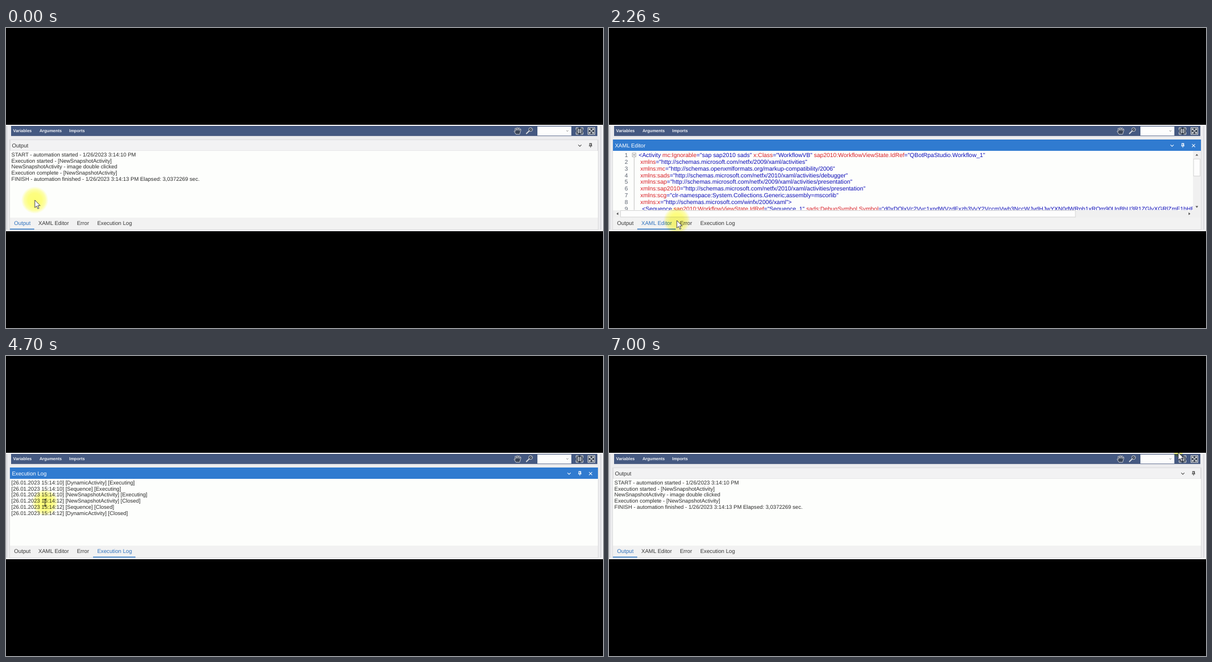
An HTML page for the animation above (7030 ms loop, 1056 by 530 pixels).

```html
<!DOCTYPE html>
<html lang="en">
<head>
<meta charset="utf-8">
<title>Output panels</title>
<style>
  html, body { margin: 0; width: 100%; height: 100%; overflow: hidden; background: #000; }
  svg { display: block; width: 1056px; height: 530px; }
  text { font-family: "Liberation Sans", Arial, sans-serif; white-space: pre; text-rendering: geometricPrecision; }
  .menu { font: 600 7.5px "Open Sans", sans-serif; fill: #f0f2f6; }
  .ui { font-size: 9.7px; fill: #383838; }
  .log { font-size: 9.56px; fill: #2c2c2c; }
  .code { font-size: 10.42px; fill: #0c0cb8; }
  .num { font-size: 10.2px; fill: #5c6470; text-anchor: end; }
  .attr { fill: #d81c24; }
  .line { fill: none; stroke-width: 1.05; }
  #halo { mix-blend-mode: multiply; }
</style>
</head>
<body>
<svg viewBox="0 0 1056 530">
  <defs>
    <clipPath id="band"><rect y="171" width="1056" height="188"/></clipPath>
    <clipPath id="codeArea"><rect x="7" y="217" width="1025.5" height="104.5"/></clipPath>
    <radialGradient id="glow">
      <stop offset="0" stop-color="#ffff78"/>
      <stop offset=".5" stop-color="#ffff80"/>
      <stop offset=".78" stop-color="#ffff88" stop-opacity=".7"/>
      <stop offset="1" stop-color="#ffff98" stop-opacity="0"/>
    </radialGradient>
    <g id="chevron"><path class="line" d="M-2.8-1.3 0 1.4 2.8-1.3"/></g>
    <g id="pin"><path class="line" d="M-1.7-3.4H1.7V.6H-1.7ZM-3 .8H3M0 .8V3.8M1-3.2V.4"/></g>
    <g id="close"><path class="line" d="M-2.7-2.7 2.7 2.7M2.7-2.7-2.7 2.7"/></g>
  </defs>
  <rect width="1056" height="530"/>
  <g clip-path="url(#band)">
    <rect y="171" width="1056" height="188" fill="#ececee"/>
    <path d="M0 172H1056M0 358H1056" stroke="#f6f6f8" stroke-width="2"/>
    <path d="M1.5 173V356M1052.5 173V356" stroke="#c4c5cb"/>
    <path d="M1054.5 171V359" stroke="#f7f7f9" stroke-width="3"/>

    <rect x="9" y="173" width="1037" height="17.5" fill="#455981"/>
    <path d="M9 174H1046M9 190H1046" stroke="#3c4f76"/>
    <g class="menu">
      <text x="12.6" y="184.3">Variables</text>
      <text x="59.2" y="184.3">Arguments</text>
      <text x="111.8" y="184.3">Imports</text>
    </g>
    <g fill="none" stroke="#d8dade" stroke-width=".9" stroke-linejoin="round" stroke-linecap="round">
      <path d="M901.8 187.4 898.8 182.6Q898.8 180.8 901 182.5L900.4 177.6Q901.6 176 902.4 178L903.2 181 903.4 176.4Q904.7 174.7 905.5 176.6V180.8L906.8 176.7Q908.2 175.5 908.7 177.3L908 181.3 909.6 178.7Q911 178 910.8 180L908.7 187.4Z" fill="#3a4558"/>
      <circle cx="928" cy="179.4" r="3.4" fill="#3a4558"/>
      <path d="M925.4 181.8 920.6 186.5" stroke-width="1.8"/>
      <path d="M927 180.3 929.3 178.2" stroke-width=".8"/>
    </g>
    <rect x="940" y="174" width="60" height="16" fill="#fdfdfd"/>
    <use href="#chevron" transform="translate(993 181.7) scale(.65)" stroke="#555"/>
    <g fill="#3c4654" stroke="#dfe1e4" stroke-width="1.1">
      <rect x="1008.5" y="176" width="12" height="12" stroke-dasharray="4 4 4 0"/>
      <path d="M1011 178 1013 180M1018 178 1016 180M1011 186 1013 184M1018 186 1016 184M1008.5 182H1012M1017 182H1020.5"/>
      <rect x="1012.7" y="180.2" width="3.6" height="3.6"/>
      <rect x="1029.5" y="176" width="12" height="12"/>
      <path d="M1031.5 178 1039.5 186M1039.5 178 1031.5 186M1031.5 180.5V178H1034M1037 178H1039.5V180.5M1031.5 183.5V186H1034M1037 186H1039.5V183.5"/>
    </g>

    <rect x="6.5" y="197.5" width="1041" height="159" fill="#f2f2f2" stroke="#dcdcde"/>
    <rect id="bar" x="7.5" y="197.5" width="1039" height="19.5"/>
    <text id="title" class="ui" x="10.4" y="210.9"/>
    <g id="buttons">
      <use href="#chevron" x="996" y="207.7"/>
      <use href="#pin" x="1015" y="207.5"/>
      <use id="closer" href="#close" x="1034" y="207.7"/>
    </g>
    <rect x="7" y="217" width="1040" height="118" fill="#fdfefc"/>
    <g id="panes"></g>
    <g id="tabs" class="ui"></g>
    <rect id="mark" y="354.5" height="1.6" fill="#3a80cc"/>

    <circle id="halo" fill="url(#glow)"/>
    <path id="arrow" d="M0 0V13.4L3.1 10.5 5.2 15.3 7.3 14.4 5.2 9.8H9.4Z" fill="#fff" stroke="#2c2c38" stroke-width=".9" stroke-linejoin="round"/>
    <path id="beam" d="M-2.6-5.8H-.8L0-5.2.8-5.8H2.6M0-5.2V5.2M-2.6 5.8H-.8L0 5.2.8 5.8H2.6" fill="none" stroke="#222" stroke-width="1.1"/>
  </g>
</svg>
<script>
const LOOP = 7030;
const $ = id => document.getElementById(id);

const el = (parent, tag, attrs = {}, text = '') => {
  const node = document.createElementNS('http://www.w3.org/2000/svg', tag);
  for (const key in attrs) node.setAttribute(key, attrs[key]);
  node.textContent = text;
  return parent.appendChild(node);
};

// name, label x, underline start, underline end
const tabs = [
  ['Output', 14.3, 7, 50],
  ['XAML Editor', 57.2, 50, 118],
  ['Error', 125.4, 118, 154],
  ['Execution Log', 161.4, 154, 229]
];
const labels = tabs.map(([name, x]) => el($('tabs'), 'text', { x, y: 348.4 }, name));
const panes = tabs.map(() => el($('panes'), 'g'));

const writeLog = (pane, lines) => lines.forEach((line, i) =>
  el(pane, 'text', { class: 'log', x: 9.6, y: 226.8 + i * 10.83 }, line));

writeLog(panes[0], [
  'START - automation started - 1/26/2023 3:14:10 PM',
  'Execution started - [NewSnapshotActivity]',
  'NewSnapshotActivity - image double clicked',
  'Execution complete - [NewSnapshotActivity]',
  'FINISH - automation finished - 1/26/2023 3:14:13 PM Elapsed: 3,0372269 sec.'
]);

writeLog(panes[3], [
  '10] [DynamicActivity] [Executing]',
  '10] [Sequence] [Executing]',
  '10] [NewSnapshotActivity] [Executing]',
  '12] [NewSnapshotActivity] [Closed]',
  '12] [Sequence] [Closed]',
  '12] [DynamicActivity] [Closed]'
].map(entry => '[26.01.2023 15:14:' + entry));

const xaml = [
  '<Activity mc:Ignorable="sap sap2010 sads" x:Class="WorkflowVB" sap2010:WorkflowViewState.IdRef="QBotRpaStudio.Workflow_1"',
  ' xmlns="http://schemas.microsoft.com/netfx/2009/xaml/activities"',
  ' xmlns:mc="http://schemas.openxmlformats.org/markup-compatibility/2006"',
  ' xmlns:sads="http://schemas.microsoft.com/netfx/2010/xaml/activities/debugger"',
  ' xmlns:sap="http://schemas.microsoft.com/netfx/2009/xaml/activities/presentation"',
  ' xmlns:sap2010="http://schemas.microsoft.com/netfx/2010/xaml/activities/presentation"',
  ' xmlns:scg="clr-namespace:System.Collections.Generic;assembly=mscorlib"',
  ' xmlns:x="http://schemas.microsoft.com/winfx/2006/xaml">',
  '  <Sequence sap2010:WorkflowViewState.IdRef="Sequence_1" sads:DebugSymbol.Symbol="d0xDOlxVc2Vyc1xndWVzdFxzb3VyY2VccmVwb3NccWJvdHJwYXN0dWRpb1xRQm90UnBhU3R1ZGlvXGRlZmF1bHRXb3Jr'
];

function buildEditor(pane) {
  const area = el(pane, 'g', { 'clip-path': 'url(#codeArea)' });
  xaml.forEach((line, i) => {
    const y = 227.6 + i * 11.97;
    el(area, 'text', { class: 'num', x: 33.5, y }, i + 1);
    const row = el(area, 'text', { class: 'code', x: 52.6, y });
    // attribute names are the words right before ="
    line.split(/([\w:.]+)(?==")/).forEach((part, k) =>
      el(row, 'tspan', k % 2 ? { class: 'attr' } : {}, part));
  });
  el(area, 'path', { d: 'M44.5 228V322', stroke: '#b4b4b4', 'stroke-width': .8 });
  el(area, 'rect', { x: 41.2, y: 221, width: 6.4, height: 6.4, fill: '#fff', stroke: '#999', 'stroke-width': .8 });
  el(area, 'path', { d: 'M42.7 224.2H46.1', stroke: '#444' });

  const box = (x, y, width, height, fill) => el(pane, 'rect', { x, y, width, height, fill });
  box(1033, 217, 14, 118, '#f0f0f0');
  box(7, 322, 1026, 13, '#f0f0f0');
  for (const [x, y, w, h] of [[1034, 231.5, 11.5, 30], [20.5, 322.5, 804.5, 11.5]])
    box(x, y, w, h, '#fdfdfd').setAttribute('stroke', '#d5d5d5');
  el(pane, 'path', { d: 'M1037.4 225.6 1039.8 222.4 1042.2 225.6ZM1037.4 314.6 1039.8 317.8 1042.2 314.6ZM16.4 325.8 13.2 328.2 16.4 330.6ZM1025.2 325.8 1028.4 328.2 1025.2 330.6Z', fill: '#505050' });
}
buildEditor(panes[1]);

// time, open tab, panel focused
const states = [[0, 0, 0], [1900, 1, 1], [3030, 2, 1], [3800, 3, 1], [5460, 0, 1], [6500, 0, 0]];

// time, x, y of the pointer
const path = [
  [0, 51, 304], [400, 51, 304], [1100, 79, 342], [1430, 83, 345], [1900, 83, 345],
  [2260, 120, 340], [2600, 137, 345], [2830, 139, 345], [3030, 139, 345],
  [3160, 154, 343], [3460, 188, 346], [4030, 188, 346], [4700, 69, 259],
  [5200, 30, 346], [5730, 30, 346], [6160, 528.5, 267], [6430, 900, 140],
  [6500, 900, 140], [7000, 1007, 170.5], [LOOP, 1007, 170.5]
];

const still = (a, b) => !a || !b || (a[1] === b[1] && a[2] === b[2]);

function slope(i, axis) {
  const a = path[i - 1], b = path[i], c = path[i + 1];
  return still(a, b) || still(b, c) ? 0 : (c[axis] - a[axis]) / (c[0] - a[0]);
}

// Hermite curve through the path points, at rest where the pointer pauses
function pointer(t) {
  let i = 0;
  while (i < path.length - 2 && t >= path[i + 1][0]) i++;
  const a = path[i], b = path[i + 1], span = b[0] - a[0];
  const u = (t - a[0]) / span, v = 1 - u;
  return [1, 2].map(k =>
    a[k] * v * v * (1 + 2 * u) + b[k] * u * u * (1 + 2 * v) +
    span * u * v * (slope(i, k) * v - slope(i + 1, k) * u));
}

const show = (node, on) => node.setAttribute('visibility', on ? 'visible' : 'hidden');

function render(t) {
  const [, open, focused] = states.filter(s => s[0] <= t).pop();
  const [name, , left, right] = tabs[open];
  panes.forEach((pane, i) => show(pane, i === open));
  labels.forEach((label, i) => label.style.fill = i === open ? '#2f72be' : '');
  $('mark').setAttribute('x', left);
  $('mark').setAttribute('width', right - left);
  $('bar').setAttribute('fill', focused ? '#307bd0' : '#f2f2f3');
  $('bar').setAttribute('stroke', focused ? '#307bd0' : '#dcdcde');
  $('title').textContent = name;
  $('title').style.fill = focused ? '#fff' : '';
  $('buttons').setAttribute('stroke', focused ? '#fff' : '#444');
  $('buttons').setAttribute('transform', `translate(${open ? 0 : 19})`);
  show($('closer'), open);

  const [x, y] = pointer(t);
  const overText = t > 4030 && y > 217 && y < 335;
  show($('arrow'), !overText);
  show($('beam'), overText);
  // the glow is small while the pointer is outside the panel
  $('halo').setAttribute('r', y < 173 ? 9 : 24);
  for (const id of ['halo', 'arrow', 'beam'])
    $(id).setAttribute('transform', `translate(${x.toFixed(2)} ${y.toFixed(2)})`);
}

let start;
function tick(now) {
  start ??= now;
  render((now - start) % LOOP);
  requestAnimationFrame(tick);
}
render(0);
requestAnimationFrame(tick);
</script>
</body>
</html>
```
